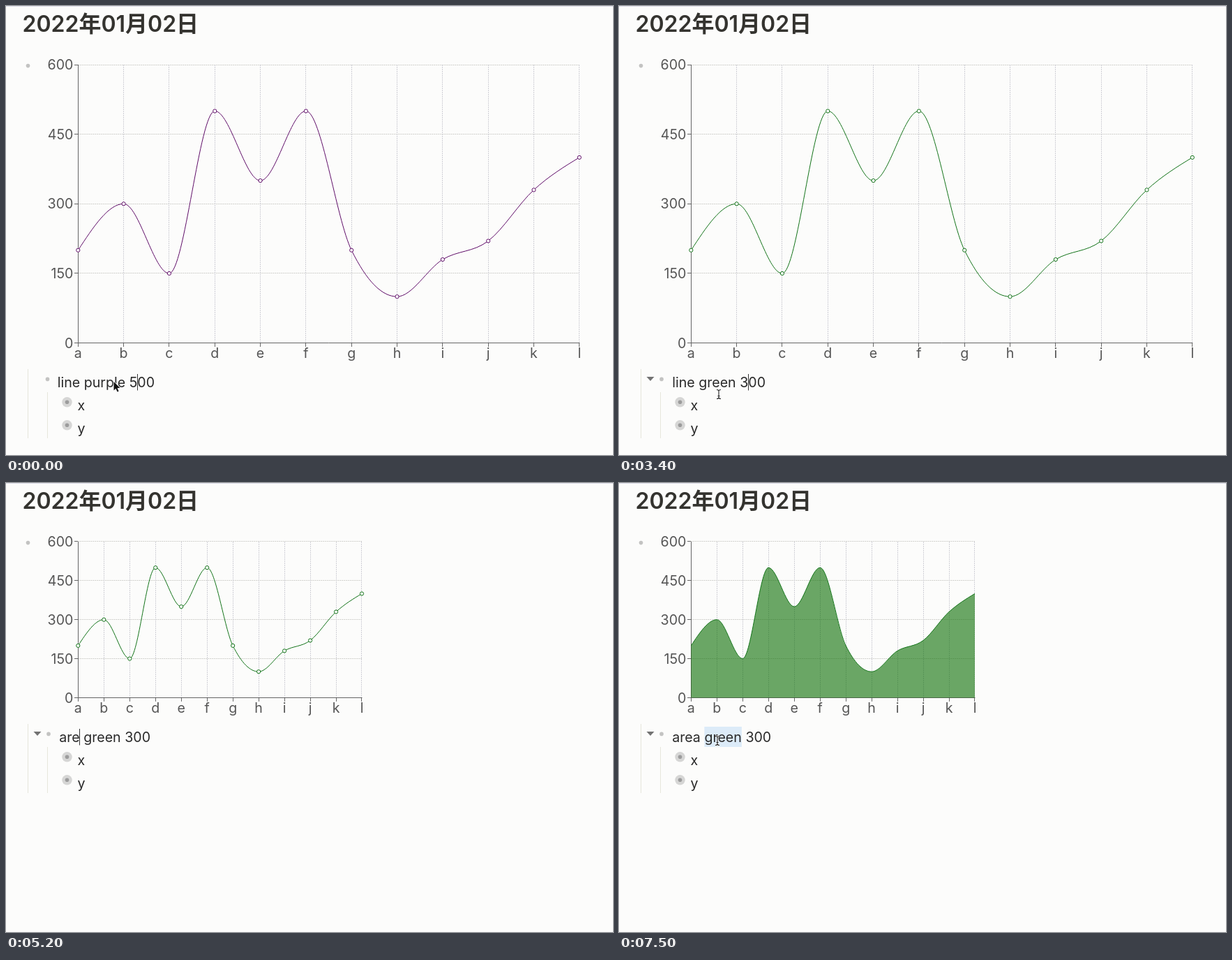
An HTML page with a canvas that plays this animation: 870 px wide and 643 px high, repeating every 8 s.

```html
<!DOCTYPE html>
<html lang="ja">
<head>
<meta charset="utf-8">
<style>
html, body { margin: 0; width: 100%; height: 100%; overflow: hidden; background: #fcfcfb; }
canvas { display: block; }
</style>
</head>
<body>
<canvas id="stage" width="870" height="643"></canvas>
<script>
const ctx = document.getElementById('stage').getContext('2d');
const LOOP = 8000;
const SANS = 'Inter, "Noto Sans CJK SC", "Noto Sans CJK JP", sans-serif';
const BODY = '400 19.6px ' + SANS;
const VALUES = [200, 300, 150, 500, 350, 500, 200, 100, 180, 220, 330, 400];
const LEFT = 103.3, TOP = 84;

// time, text, caret position (-1: none), selected word
const EDITS = [
  [0, 'line purple 500', 13],
  [400, 'line purple 500', -1, 'purple'],
  [1100, 'line  500', 5],
  [1200, 'line g 500', 6],
  [1400, 'line gr 500', 7],
  [1500, 'line gre 500', 8],
  [1600, 'line gree 500', 9],
  [1800, 'line green 500', 10],
  [2600, 'line green 500', 12],
  [2900, 'line green 00', 11],
  [3000, 'line green 300', 12],
  [4500, 'line green 300', -1, 'line'],
  [4800, ' green 300', 0],
  [4900, 'a green 300', 1],
  [5000, 'ar green 300', 2],
  [5200, 'are green 300', 3],
  [5300, 'area green 300', 4],
  [7200, 'area green 300', -1, 'green']
];

// time, x, y, pointer shape
const MOUSE = [
  [0, 154.5, 538, 'arrow'],
  [100, 150, 541, 'beam'],
  [300, 143, 542, 'beam'],
  [1100, 143, 542, ''],
  [2200, 143, 546, 'beam'],
  [2500, 179, 541, 'beam'],
  [2900, 179, 541, ''],
  [3300, 158, 551, 'beam'],
  [3400, 143, 556, 'beam'],
  [3700, 139, 546, 'beam'],
  [3800, 120, 475, 'arrow'],
  [3900, 92, 410, 'arrow'],
  [4000, 82, 392, 'hand'],
  [4100, 82, 390, 'hand'],
  [4200, 86, 378, 'beam'],
  [4400, 92, 367, 'beam'],
  [4800, 92, 367, ''],
  [6600, 98, 376, 'beam'],
  [7100, 141, 369, 'beam'],
  [8000, 141, 369, 'beam']
];

const lastBefore = (list, t) => list.filter(e => e[0] <= t).pop();

function label(text, x, y, align = 'left', color = '#292929', font = BODY) {
  ctx.font = font;
  ctx.fillStyle = color;
  ctx.textAlign = align;
  ctx.fillText(text, x, y);
}

function line(x1, y1, x2, y2, color, width = 1, dash = []) {
  ctx.strokeStyle = color;
  ctx.lineWidth = width;
  ctx.setLineDash(dash);
  ctx.beginPath();
  ctx.moveTo(x1, y1);
  ctx.lineTo(x2, y2);
  ctx.stroke();
  ctx.setLineDash([]);
}

function dot(x, y, r, color) {
  ctx.fillStyle = color;
  ctx.beginPath();
  ctx.arc(x, y, r, 0, 7);
  ctx.fill();
}

function polygon(points, fill) {
  ctx.beginPath();
  points.forEach(([x, y]) => ctx.lineTo(x, y));
  ctx.closePath();
  ctx.fillStyle = fill;
  ctx.fill();
}

// Monotone cubic through evenly spaced points
function curve(pts) {
  const n = pts.length, h = pts[1][0] - pts[0][0];
  const d = pts.slice(1).map((p, i) => (p[1] - pts[i][1]) / h);
  const m = pts.map((p, i) => {
    if (i === 0 || i === n - 1) return 0;
    const a = d[i - 1], b = d[i];
    return (Math.sign(a) + Math.sign(b)) *
      Math.min(Math.abs(a), Math.abs(b), Math.abs(a + b) / 4);
  });
  m[0] = (3 * d[0] - m[1]) / 2;
  m[n - 1] = (3 * d[n - 2] - m[n - 2]) / 2;
  ctx.beginPath();
  ctx.moveTo(...pts[0]);
  for (let i = 1; i < n; i++) {
    const [x0, y0] = pts[i - 1], [x1, y1] = pts[i];
    ctx.bezierCurveTo(x0 + h / 3, y0 + m[i - 1] * h / 3,
      x1 - h / 3, y1 - m[i] * h / 3, x1, y1);
  }
}

function chart(right, bottom, color, area) {
  const step = (right - LEFT) / 11;
  const px = i => LEFT + i * step;
  const py = v => bottom - v * (bottom - TOP) / 600;
  const snap = v => Math.floor(v) + 0.5;
  const pts = VALUES.map((v, i) => [px(i), py(v)]);

  for (let v = 150; v <= 600; v += 150)
    line(LEFT, snap(py(v)), right, snap(py(v)), '#cfcfcb', 1, [2, 1]);
  for (let i = 1; i < 12; i++)
    line(snap(px(i)), TOP, snap(px(i)), bottom, '#cfcfd6', 1, [2, 1]);

  line(103.5, TOP, 103.5, bottom + 0.5, '#666');
  line(LEFT, snap(bottom), right + 0.5, snap(bottom), '#666');
  for (let v = 0; v <= 600; v += 150) {
    line(98, snap(py(v)), 103, snap(py(v)), '#666');
    label(v, 96.4, py(v) + 7.1, 'right', '#555');
  }
  for (let i = 0; i < 12; i++) {
    line(snap(px(i)), bottom, snap(px(i)), bottom + 5.5, '#666');
    label('abcdefghijkl'[i], px(i), bottom + 21.4, 'center', '#555');
  }

  if (area) {
    curve(pts);
    ctx.lineTo(right, bottom);
    ctx.lineTo(LEFT, bottom);
    ctx.globalAlpha = 0.6;
    ctx.fillStyle = 'rgb(10,110,2)';
    ctx.fill();
    ctx.globalAlpha = 1;
  }
  curve(pts);
  ctx.strokeStyle = color;
  ctx.lineWidth = 1;
  ctx.stroke();
  if (area) return;
  for (const [x, y] of pts) {
    dot(x, y, 2.6, '#fff');
    ctx.stroke();
  }
}

function child(name, y, hover) {
  const dx = hover ? 2 : 0;
  if (hover) polygon([[69.5, y - 16.5], [75.5, y - 11.5], [69.5, y - 6.5]], '#777');
  dot(87.5 + dx, y - 11.2, 7.2, '#d6d6d5');
  dot(87.5 + dx, y - 11.2, 2.8, '#9c9c9c');
  label(name, 102.6 + dx * 1.25, y);
}

function outline(t, base, edit, caretOn) {
  const [, text, caret, word] = edit;
  const hover = t >= 100 && !(t >= 3800 && t < 4200);
  const x = hover ? 76.2 : 73.7;
  line(31.5, base - 26, 31.5, base + 73, '#e6e6dc');
  line(59.5, base + 7, 59.5, base + 73, '#e6e6dc');
  if (hover)
    polygon([[39.5, base - 15], [50.5, base - 15], [45, base - 9]], '#737373');
  dot(hover ? 61 : 59.5, base - 11.6, 2.8, '#c3c3c2');

  ctx.font = BODY;
  const width = n => ctx.measureText(text.slice(0, n)).width;
  if (word) {
    const from = text.indexOf(word);
    const a = x + width(from), b = x + width(from + word.length);
    ctx.fillStyle = '#dcebf8';
    ctx.fillRect(a, base - 22, b - a, 29);
  }
  label(text, x, base);
  if (caret >= 0 && caretOn) {
    const cx = Math.floor(x + width(caret)) + 0.5;
    line(cx, base - 19, cx, base + 4.5, '#333');
  }
  child('x', base + 32.5, t >= 3900 && t < 4200);
  child('y', base + 65.5, false);
}

function shape(path, fill, stroke, width) {
  const p = new Path2D(path);
  ctx.lineJoin = 'round';
  ctx.strokeStyle = stroke;
  ctx.lineWidth = width;
  ctx.stroke(p);
  if (fill) {
    ctx.fillStyle = fill;
    ctx.fill(p);
  }
}

function pointer(t) {
  const a = lastBefore(MOUSE, t);
  const b = MOUSE[MOUSE.indexOf(a) + 1];
  const kind = a[3];
  if (!kind) return;
  const k = b && b[3] ? (t - a[0]) / (b[0] - a[0]) : 0;
  const at = i => a[i] + (k ? (b[i] - a[i]) * k : 0);
  ctx.save();
  ctx.translate(at(1), at(2));
  if (kind === 'arrow') {
    shape('M0 0V12.5L2.9 9.8L5 14.6L7.1 13.7L5 9H9Z', '#111', '#fff', 1.6);
  } else if (kind === 'beam') {
    const path = 'M-3 -6.5Q0 -6.5 0 -4.5V4.5Q0 6.5 -3 6.5M3 -6.5Q0 -6.5 0 -4.5M0 4.5Q0 6.5 3 6.5M-1.5 2.5H1.5';
    shape(path, null, '#fff', 2.6);
    shape(path, null, '#222', 1.1);
  } else {
    shape('M-4.5 -6Q-3 -7.5 -1.8 -5.5L-0.5 -2Q1 -3.5 2 -2Q3.5 -3 4.3 -1.5Q6 -2 6.2 0L6 3L4.5 7H-1.5L-5.5 2Q-6 0 -3.6 0.8L-2.8 1.4Z',
      '#fff', '#222', 1.2);
  }
  ctx.restore();
}

function draw(time) {
  const t = Math.floor((time % LOOP) / 100) * 100;
  const small = t >= 3700;
  const edit = lastBefore(EDITS, t);
  ctx.fillStyle = '#fcfcfb';
  ctx.fillRect(0, 0, 870, 643);
  line(0, 0.5, 870, 0.5, '#dcdce8');
  label('2022年01月02日', 23.5, 37, 'left', '#34332f', '600 32px ' + SANS);
  dot(31.5, 85.6, 2.8, '#c3c3c2');
  chart(small ? 510 : 821.8, small ? 307.4 : 482.6,
    t < 2100 ? '#5f0c68' : '#127318', t >= 5500);
  outline(t, small ? 371 : 546, edit, (t - edit[0]) % 1000 < 500);
  pointer(t);
}

const start = performance.now();
function tick(now) {
  draw(Math.max(0, now - start));
  requestAnimationFrame(tick);
}
draw(0);
requestAnimationFrame(tick);
</script>
</body>
</html>
```
